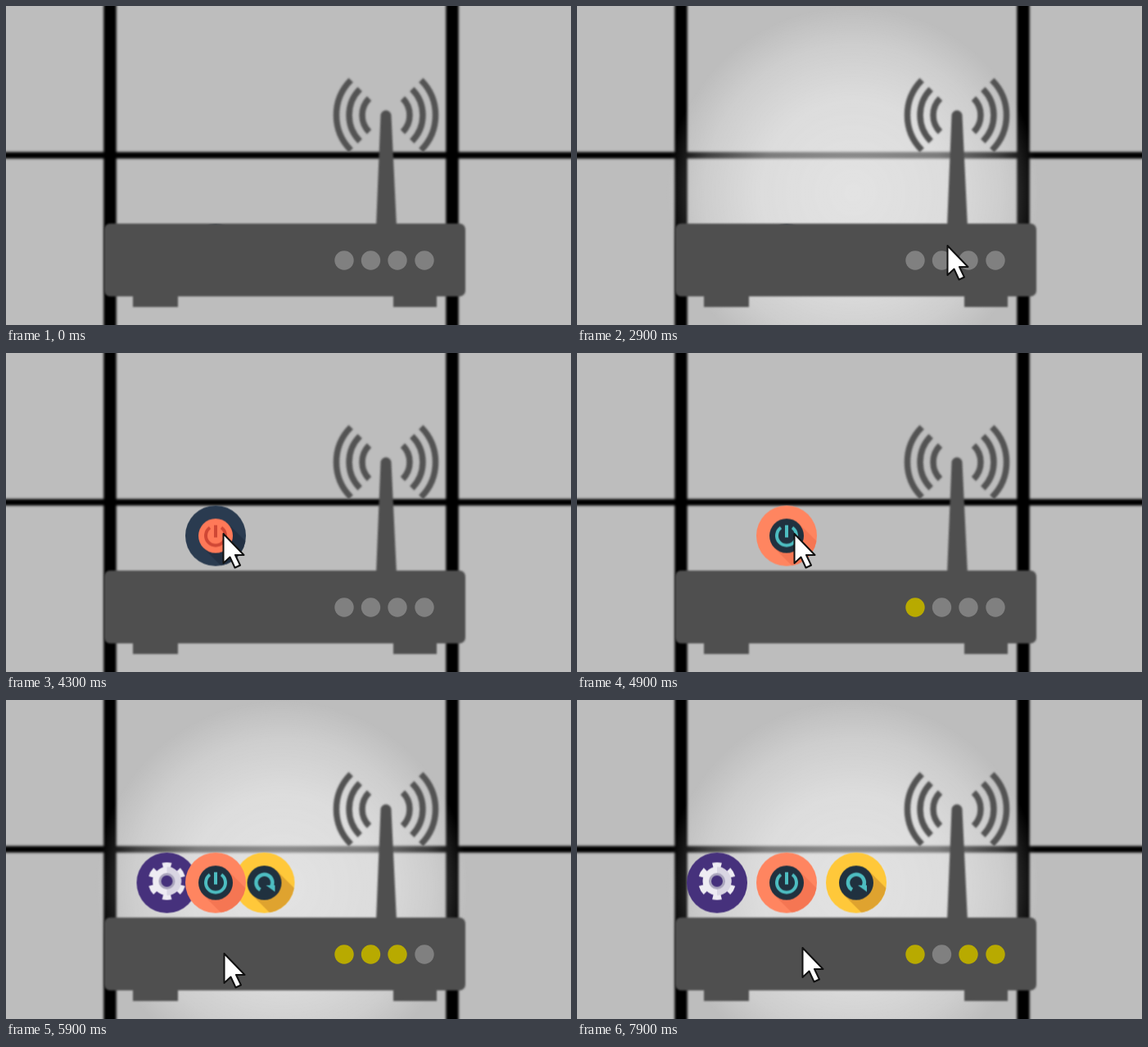
An HTML page that plays this animation: 690 px wide and 390 px high, repeating every 8 s.

```html
<!DOCTYPE html>
<html lang="en">
<head>
<meta charset="utf-8">
<title>Router</title>
<style>
  html, body { margin: 0; width: 100%; height: 100%; overflow: hidden; background: #bdbdbd; }
  svg { display: block; width: 690px; height: 390px; }

  /* 1.25% of the loop is one 100 ms tick */
  .anim { animation: 8s step-end infinite; }
  #glow { animation-name: glow; }
  #rise { animation-name: rise; }
  #off { animation-name: off; }
  #on { animation-name: on; }
  .side { animation-name: slide; }
  #gear { --dx: -85px; }
  #reload { --dx: 85px; }
  #cursor { animation-name: cursor; }
  .led { fill: #808080; }
  #led1 { animation-name: led1; }
  #led2 { animation-name: led2; }
  #led3 { animation-name: led3; }
  #led4 { animation-name: led4; }

  @keyframes glow {
    0%, 51.25%, 100% { opacity: 0; }
    22.5% { opacity: .6; }
    23.75%, 66.25% { opacity: 1; }
  }
  @keyframes rise {
    0% { transform: translateY(80px); }
    40% { transform: translateY(80px); animation-timing-function: steps(8); }
    50%, 100% { transform: none; }
  }
  @keyframes off {
    0% { opacity: 1; }
    58.75%, 100% { opacity: 0; }
  }
  @keyframes on {
    0% { opacity: 0; }
    58.75%, 100% { opacity: 1; }
  }
  @keyframes slide {
    0% { opacity: 0; transform: translateX(0); }
    65% { opacity: 1; transform: translateX(0); animation-timing-function: steps(10); }
    77.5%, 100% { opacity: 1; transform: translateX(var(--dx)); }
  }
  @keyframes cursor {
    0% { transform: translate(620px, 420px); }
    20% { transform: translate(620px, 420px); animation-timing-function: steps(3); }
    23.75% { transform: translate(517px, 283px); animation-timing-function: steps(3); }
    27.5% { transform: translate(452px, 293px); }
    40% { transform: translate(452px, 293px); animation-timing-function: steps(6); }
    47.5% { transform: translate(376px, 288px); animation-timing-function: steps(5); }
    53.75% { transform: translate(265px, 221px); }
    62.5% { transform: translate(265px, 221px); animation-timing-function: steps(4); }
    67.5% { transform: translate(266px, 308px); }
    68.75% { transform: translate(266px, 310px); }
    98.75%, 100% { transform: translate(275px, 303px); }
  }
  @keyframes led1 {
    0% { fill: #808080; }
    58.75%, 100% { fill: #b8aa00; }
  }
  @keyframes led2 {
    0%, 75%, 95% { fill: #808080; }
    72.5%, 92.5% { fill: #b8aa00; }
    100% { fill: #808080; }
  }
  @keyframes led3 {
    0%, 75%, 87.5%, 96.25% { fill: #808080; }
    71.25%, 86.25%, 91.25%, 98.75%, 100% { fill: #b8aa00; }
  }
  @keyframes led4 {
    0%, 71.25%, 77.5%, 86.25%, 95% { fill: #808080; }
    65%, 75%, 85%, 92.5%, 98.75%, 100% { fill: #b8aa00; }
  }
</style>
</head>
<body>
<svg viewBox="0 0 690 390">
  <defs>
    <filter id="soft" filterUnits="userSpaceOnUse" x="-20" y="-20" width="730" height="430">
      <feGaussianBlur stdDeviation="1.5"/>
    </filter>
    <filter id="slight" filterUnits="userSpaceOnUse" x="0" y="0" width="690" height="390">
      <feGaussianBlur stdDeviation=".8"/>
    </filter>
    <radialGradient id="light" gradientUnits="userSpaceOnUse" cx="337" cy="228" r="228">
      <stop offset="0" stop-color="#fff" stop-opacity=".58"/>
      <stop offset=".5" stop-color="#fff" stop-opacity=".48"/>
      <stop offset=".8" stop-color="#fff" stop-opacity=".25"/>
      <stop offset="1" stop-color="#fff" stop-opacity="0"/>
    </radialGradient>
    <clipPath id="disc"><circle r="37"/></clipPath>
    <path id="shade" d="M-15 15L15 -15L50 20L20 50Z" clip-path="url(#disc)"/>
    <g id="power" fill="none" stroke-width="4">
      <path d="M-7 -10A12 12 0 1 0 7 -10"/>
      <path d="M0 -13V2"/>
    </g>
    <g id="waves" fill="none" stroke="#525252" stroke-width="7.5">
      <path d="M42.8 -42.8A60.5 60.5 0 0 1 42.8 42.8"/>
      <path d="M31.8 -31.8A45 45 0 0 1 31.8 31.8"/>
      <path d="M20.5 -20.5A29 29 0 0 1 20.5 20.5"/>
    </g>
  </defs>

  <rect width="690" height="390" fill="#bdbdbd"/>
  <path d="M127 -20V410M545 -20V410" stroke="#000" stroke-width="15.5" filter="url(#soft)"/>
  <path d="M-20 182.5H710" stroke="#000" stroke-width="8" filter="url(#soft)"/>
  <rect id="glow" class="anim" width="690" height="390" fill="url(#light)"/>

  <g transform="translate(256 223.5)">
    <g id="gear" class="anim side">
      <circle r="37" fill="#46317c"/>
      <g transform="translate(0 -2)" fill="none">
        <circle r="18.5" stroke="#eeecf3" stroke-width="9" pathLength="12" stroke-dasharray="1 1" transform="rotate(-105)"/>
        <circle r="13" stroke="#eeecf3" stroke-width="9"/>
        <path d="M0 -13A13 13 0 0 1 0 13" stroke="#d9d6e3" stroke-width="9"/>
        <circle r="8.5" stroke="#aaa5bd" stroke-width="3"/>
      </g>
    </g>
    <g id="reload" class="anim side">
      <circle r="37" fill="#ffc83a"/>
      <use href="#shade" fill="#dfa32f"/>
      <circle r="21" fill="#20313f"/>
      <path d="M-5 8.5A10 10 0 1 1 9 4" fill="none" stroke="#4dbdc1" stroke-width="4.5"/>
      <path d="M2 3H13V11Z" fill="#4dbdc1"/>
    </g>
    <g id="rise" class="anim">
      <g id="off" class="anim">
        <circle r="37" fill="#2a3b50"/>
        <use href="#shade" fill="#223043"/>
        <circle r="21" fill="#ff7958"/>
        <use href="#power" stroke="#cf4735"/>
      </g>
      <g id="on" class="anim">
        <circle r="37" fill="#ff8560"/>
        <use href="#shade" fill="#f57653"/>
        <circle r="21" fill="#20313f"/>
        <use href="#power" stroke="#4dbdc1"/>
      </g>
    </g>
  </g>

  <g filter="url(#slight)" fill="#505050">
    <rect x="120" y="266" width="441" height="89" rx="7"/>
    <path d="M155 352H210V368H155ZM473 352H526V368H473Z"/>
    <path d="M452 270L457.5 134A6.5 6.5 0 0 1 470.5 134L477 270Z"/>
    <use href="#waves" transform="translate(464 133.5)"/>
    <use href="#waves" transform="translate(464 133.5) scale(-1 1)"/>
  </g>
  <circle id="led1" class="anim led" cx="413" cy="311" r="11.7"/>
  <circle id="led2" class="anim led" cx="445.5" cy="311" r="11.7"/>
  <circle id="led3" class="anim led" cx="478" cy="311" r="11.7"/>
  <circle id="led4" class="anim led" cx="511" cy="311" r="11.7"/>

  <g id="cursor" class="anim">
    <path d="M.5 0V36L8.500 28.500L14.500 41.500L21 38.500L15 26H25.500Z" fill="#fff" stroke="#111" stroke-width="2" stroke-linejoin="round"/>
  </g>
</svg>
</body>
</html>
```
